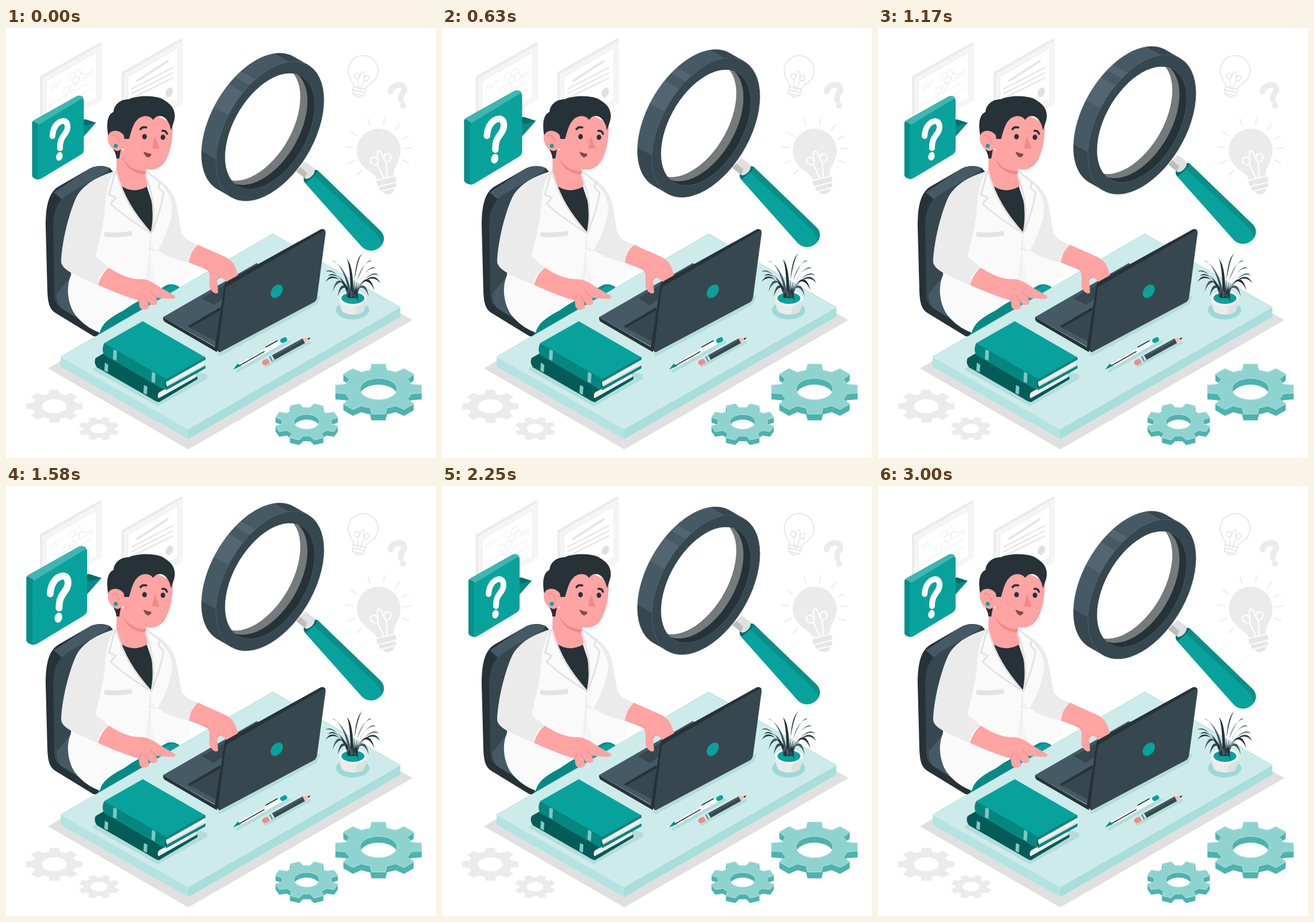
These frames come from a looping animation (748 by 748 pixels, 3040 ms). An HTML page:

```html
<!DOCTYPE html>
<html lang="en">
<head>
<meta charset="utf-8">
<title>Research desk</title>
<style>
html, body { margin: 0; width: 100%; height: 100%; overflow: hidden; background: #fff; }
svg { display: block; width: 100vw; height: 100vh; }
.line { fill: none; stroke-linecap: round; stroke-linejoin: round; }
</style>
</head>
<body>
<svg viewBox="0 0 748 748">
  <defs>
    <path id="filament" d="M645 262 640 236C628 238 627 222 635 222 642 222 644 231 640 236 646 231 641 214 648 214 655 214 650 231 656 236 652 231 654 222 661 222 669 222 668 238 656 236L651 262"/>
  </defs>
  <g id="frames">
    <path fill="#ebebeb" d="M59 84 164 25 167 27V124L63 182 59 205Z"/>
    <path fill="#f5f5f5" d="M63 87 167 28V125L63 186Z"/>
    <path fill="#fff" stroke="#ebebeb" d="M70 92 158 42V122L70 172Z"/>
    <g class="line" stroke="#ebebeb">
      <path d="M76 104 98 92M76 109 92 100M138 82 152 74M138 87 152 79M76 134 150 92M128 118 152 104"/>
      <path id="hexes"/>
    </g>
    <path fill="#ebebeb" d="M201 77 305 18 308 20V131L204 189 201 187Z"/>
    <path fill="#f5f5f5" d="M205 80 308 21V131L205 189Z"/>
    <path fill="#fff" stroke="#ebebeb" d="M212 85 299 35V124L212 174Z"/>
    <g class="line" stroke="#e6e6e6">
      <path stroke-width="4" d="M228 92 281 58"/>
      <path stroke-width="2.5" d="M219 106 290 69M219 114 290 78M219 122 290 87M262 126 272 121"/>
    </g>
    <ellipse cx="284" cy="112" rx="6" ry="8.5" fill="#e0e0e0" transform="rotate(25 284 112)"/>
  </g>

  <g id="bulbs">
    <g transform="rotate(12 621 75)" class="line" stroke="#e6e6e6" stroke-width="1.8">
      <path d="M611 105C610 96 595 91 595 74A26 26 0 0 1 647 74C647 91 632 96 631 105Z"/>
      <path d="M610 105H632V111H610ZM611 111H631V117H611ZM614 117Q621 125 628 117"/>
      <use href="#filament" stroke-width="2.4" transform="translate(180.500 -70) scale(.68)"/>
    </g>
    <g transform="translate(684 116) rotate(-14)">
      <path class="line" stroke="#ebebeb" stroke-width="10" stroke-linecap="butt" d="M-13 -9C-11 -20 12 -20 11 -8 10 0 1 -2 1 10"/>
      <circle cx="2" cy="20" r="5.5" fill="#ebebeb"/>
    </g>
    <path id="rays" class="line" stroke="#ebebeb" stroke-width="2"/>
    <g transform="rotate(-14 648 212)">
      <path fill="#ebebeb" d="M633 262C632 247 610 239 610 213A38 38 0 0 1 686 213C686 239 664 247 663 262Z"/>
      <path fill="#e6e6e6" d="M631 264H665V273H631ZM633 275H663V282H633ZM637 284H659Q656 291 648 291T637 284Z"/>
      <use href="#filament" class="line" stroke="#fff" stroke-width="2.2"/>
    </g>
  </g>
  <g id="gears"></g>

  <g id="chair">
    <path fill="#263238" d="M69 345C69 307 75 286 91 276L143 246C155 239 169 238 181 244L196 262 165 538 152 536 85 495C75 488 73 477 72 459Z"/>
    <path fill="#455a64" d="M83 286 143 246C155 239 169 238 181 244L174 252 102 298C98 301 93 294 83 286Z"/>
    <path fill="#37474f" d="M181 247 110 288C92 299 83 312 82 345L84 465C84 475 89 482 97 487L162 527 190 400Z"/>
    <path fill="#455a64" d="M88 462 113 432 165 530 97 488Q88 482 88 462Z"/>
  </g>

  <g id="person">
    <path fill="#078a85" d="M160 534C164 512 178 504 200 492L280 447Q291 443 302 451L250 492 168 540Z"/>
    <path fill="#08a29c" d="M240 476 288 447 300 452 250 488Z"/>
    <path fill="#fafafa" d="M189 249C150 262 128 275 118 310L113 430C104 450 107 478 119 497Q136 520 163 530C168 511 185 502 205 491L262 452 322 434V410C300 402 292 390 289 360L290 300C287 275 264 260 246 250Z"/>
    <path fill="#f5f5f5" d="M250 362C249 392 245 420 240 440L260 452 264 398Z"/>
    <path fill="#ebebeb" d="M248 256C272 263 290 280 296 305L305 356C310 367 322 373 334 377Q319 390 318 408C296 404 278 396 264 387 276 365 289 335 289 312 288 290 270 268 248 256Z"/>
    <path fill="#fafafa" d="M248 384Q285 400 318 409L322 425 262 445Z"/>
    <path class="line" stroke="#e6e6e6" d="M251 360Q251 405 246 438M248 384 264 387"/>
    <path fill="#ebebeb" d="M189 250C155 260 132 275 122 295 105 333 96 385 96 407 97 421 124 432 160 447 161 432 168 422 179 417L156 398C158 382 169 350 172 315 174 285 178 265 189 250Z"/>
    <path fill="#ffa3a3" d="M193 205 192 248C193 262 196 275 212 284 230 288 246 283 246 272L243 240Z"/>
    <path fill="#f08a8a" d="M204 226C212 242 226 248 243 249L242 255C222 254 208 242 204 226Z"/>
    <path fill="#263238" d="M196 272Q220 290 245 276L257 312Q261 335 253 357 214 327 196 272Z"/>
    <g stroke="#e3e3e3" stroke-width="3" fill="#fafafa" stroke-linejoin="round">
      <path d="M190 250 179 290 191 295 182 306C203 325 228 342 252 357 224 325 204 296 192 251Z"/>
      <path d="M245 250 268 268 265 277 274 287C270 314 260 340 253 357 260 325 257 293 243 256Z"/>
    </g>
    <path fill="#e3e3e3" d="M171 355Q195 357 219 353V361Q195 366 171 363Z"/>
    <g id="head">
      <path fill="#ffa3a3" d="M205 188 216 160 256 149 290 166C291 196 284 226 272 238 261 249 244 248 232 242 214 234 205 218 202 202Z"/>
      <path fill="#263238" d="M192 227C192 215 181 205 178 189 174 166 176 151 187 146 188 133 199 124 213 124 230 117 262 116 276 126 293 136 297 150 291 166L287 178C285 165 278 153 267 153 261 153 258 157 256 160 251 152 240 151 231 157 220 166 218 181 214 193L203 193 197 227Z"/>
      <path fill="#ffa3a3" d="M205 187C197 175 179 176 177 190 176 203 187 214 195 214L208 207Z"/>
      <path class="line" stroke="#f08a8a" stroke-width="1.5" d="M184 188Q193 183 197 199"/>
      <circle cx="191" cy="205" r="3.5" fill="#08a29c"/>
      <ellipse cx="241" cy="189" rx="4" ry="4.5" fill="#263238"/>
      <ellipse cx="273" cy="190" rx="4" ry="4.5" fill="#263238"/>
      <path class="line" stroke="#263238" stroke-width="3.5" d="M234 176Q237 171 244 173M272 179Q278 178 280 184"/>
      <path fill="#f08a8a" d="M259 188 254 209 267 210Z"/>
      <path fill="#7d4a4a" d="M239 215Q246 218 253 219 252 225 246 225 241 222 239 215Z"/>
    </g>
  </g>

  <g id="desk">
    <path fill="#e0e0e0" d="M73 592 95 579 317 700 686 496 707 508 317 733Z"/>
    <path fill="#cdebea" d="M95 572 464 358 686 486 317 698Z"/>
    <path fill="#b4e3e2" d="M95 572 317 698V715L95 589Z"/>
    <path fill="#a8dedb" d="M317 698 686 486V502L317 715Z"/>
    <path class="line" stroke="#9cd9d6" stroke-width=".8" d="M95 572 464 358 686 486"/>
  </g>

  <g id="books">
    <path fill="#b4dcda" d="M154 590 200 565 350 603V610L264 658 150 594Z"/>
    <path fill="#045c58" d="M156 574 222 536 333 600 264 641 268 650 158 590Q152 582 156 574Z"/>
    <path fill="#f0f0f0" d="M266 634 330 598 330 612 266 645Q262 640 266 634Z"/>
    <path fill="#045c58" d="M262 646 333 606V611L266 651Q260 650 262 646ZM156 574 264 634 262 650 158 590Z"/>
    <path fill="#7cc9c5" d="M172 582 178 586 177 599 171 596ZM240 621 246 624 245 638 239 635Z"/>
    <path fill="#08a29c" d="M171 548 238 510 347 573 278 613Z"/>
    <path fill="#058680" d="M171 548 278 610 276 630 171 569Q165 559 171 548Z"/>
    <path fill="#fafafa" d="M281 610 345 577 345 590 281 625Q276 618 281 610Z"/>
    <path fill="#e0e0e0" d="M280 620 345 584V590L281 625Z"/>
    <path fill="#058680" d="M277 611 347 572V577L280 615ZM276 626 347 587V592L279 630Z"/>
    <path fill="#7cc9c5" d="M187 559 193 562 192 579 186 576ZM254 598 260 601 259 618 253 615Z"/>
  </g>

  <g id="laptop-base">
    <path fill="#b4dcda" d="M290 523 366 568 548 464 541 481 372 571Z"/>
    <path fill="#455a64" d="M273 503 436 409 450 416 375 556 367 556Z"/>
    <path fill="#263238" d="M273 503 367 557V564L276 511Q273 509 273 503Z"/>
    <path fill="#37474f" d="M341 470 432 416 445 422 398 455 362 482Z"/>
    <path fill="#263238" d="M316 519 372 486 376 491 323 523Z"/>
    <path fill="#37474f" d="M320 521 375 490 370 548Z"/>
  </g>
  <g id="hands" fill="#ffa3a3">
    <path d="M179 417Q166 426 160 447C182 456 205 467 231 474L232 484C235 491 241 491 244 489L249 487 247 475Q251 482 256 482L262 481Q264 477 261 469 278 471 291 471 296 470 294 466L270 452C259 445 249 437 236 437 214 437 198 429 179 417Z"/>
    <path d="M334 377Q320 389 318 408L349 420C357 426 353 439 354 451 358 459 365 465 369 460L367 438Q374 430 383 441L393 447 405 435C400 416 396 405 381 398Z"/>
    <path class="line" stroke="#f08a8a" stroke-width="1.3" d="M231 474 236 464M247 475 240 465M261 469 251 459M367 438 371 433M345 415 352 421"/>
  </g>
  <g id="laptop-lid">
    <path fill="#263238" d="M363 557 380 447Q381 443 386 440L548 350Q553 349 556 353L384 452 371 564Z"/>
    <path fill="#37474f" d="M385 449 552 353Q556 351 556 357L541 469Q540 474 536 477L372 564Q368 564 369 558L382 455Q382 451 385 449Z"/>
    <ellipse cx="471" cy="458" rx="9" ry="13" fill="#08a29c" transform="rotate(38 471 458)"/>
  </g>

  <g id="pens" class="line">
    <path stroke="#b4dcda" stroke-width="5" d="M402 597 492 546M452 588 528 547"/>
    <path stroke="#fafafa" stroke-width="7" stroke-linecap="butt" d="M408 586 480 545"/>
    <path stroke="#37474f" stroke-width="2" d="M405 588 449 563"/>
    <path stroke="#08a29c" stroke-width="8" d="M481 544 485 542"/>
    <path fill="#078a85" d="M395 594 403 584 409 588Z"/>
    <path stroke="#263238" stroke-width="1.5" d="M452 555 472 544"/>
    <path stroke="#37474f" stroke-width="9" stroke-linecap="butt" d="M460 576 518 544"/>
    <path stroke="#455a64" stroke-width="3" stroke-linecap="butt" d="M459 574 517 542"/>
    <path stroke="#f08a8a" stroke-width="9" d="M450 582 454 580"/>
    <path stroke="#e0e0e0" stroke-width="9" stroke-linecap="butt" d="M457 578 465 573"/>
    <path stroke="#08a29c" stroke-width="9" stroke-linecap="butt" d="M460 576 462 575"/>
    <path fill="#ffb8b0" d="M516 540 529 539 520 548Z"/>
    <path fill="#263238" d="M525 539.500 530 538.500 526 543Z"/>
  </g>

  <g id="plant">
    <ellipse cx="603" cy="491" rx="29" ry="16" fill="#9cd9d6"/>
    <path fill="#ebebeb" d="M580 470H627C627 484 623 492 620 495Q604 502 587 495C583 491 580 484 580 470Z"/>
    <path fill="#e0e0e0" d="M610 484Q627 478 627 470C627 484 623 492 620 495Q614 498 608 498Z"/>
    <ellipse cx="603.500" cy="470" rx="24" ry="13" fill="#fafafa"/>
    <ellipse cx="603.500" cy="470" rx="20" ry="10" fill="#08a29c"/>
    <g id="leaves"></g>
  </g>

  <g id="bubble">
    <path fill="#078a85" d="M132 160 156 165 132 192Z"/>
    <path fill="#056e6a" d="M130 160 138 159 156 165 138 170Z"/>
    <path fill="#3fb6b1" d="M46 166Q46 162 50 160L123 119Q128 117 133 120L135 126 58 171Z"/>
    <path fill="#078f8a" d="M46 166Q46 162 49 163L57 168V263Q46 261 46 256Z"/>
    <path fill="#08a29c" d="M55 175Q55 170 60 167L129 125Q135 121 135 127V211Q135 217 130 220L62 261Q55 265 55 258Z"/>
    <path class="line" stroke="#fff" stroke-width="10" stroke-linecap="butt" d="M81 188C82 171 91 163 99 162 108 161 109 174 104 182 98 191 94 194 94 209"/>
    <ellipse cx="93" cy="223" rx="5.500" ry="7.500" fill="#fff" transform="rotate(15 93 223)"/>
  </g>

  <g id="lens">
    <g transform="translate(0 1.500)">
      <path fill="#08a29c" d="M518 260C520 250 532 243 542 246L650 350C661 360 659 372 650 380 640 389 626 387 618 378L520 268Q517 264 518 260Z"/>
      <path fill="#078f8a" d="M537 246 542 246 650 350C659 358 659 368 653 376 652 365 646 358 637 350L534 254Z"/>
      <path fill="#056e6a" d="M518 260C520 250 532 243 542 246 540 254 529 262 521 268Q517 264 518 260Z"/>
      <path fill="#e0e0e0" d="M505 248 521 231 537 243Q538 251 531 257 524 263 520 260Z"/>
      <path fill="#bdbdbd" d="M505 248 512 240 524 251 520 260Z"/>
    </g>
  </g>
</svg>
<script>
const $ = id => document.getElementById(id);
const rad = deg => deg * Math.PI / 180;
const toPath = pts => 'M' + pts.map(p => p.map(v => v.toFixed(1)).join(' ')).join('L') + 'Z';

function add(parent, tag, attrs) {
  const el = document.createElementNS('http://www.w3.org/2000/svg', tag);
  for (const key in attrs) el.setAttribute(key, attrs[key]);
  parent.append(el);
  return el;
}

// Gears lying on the ground plane
function gear(cx, cy, r, hole, turn, depth, top, side, rim) {
  const flat = (a, k) => [cx + k * Math.cos(a), cy + k * Math.sin(a) * .58];
  const pts = [], ring = [];
  for (let i = 0; i < 8; i++) {
    const a = rad(turn + i * 45);
    for (const [da, k] of [[-.25, .77], [-.16, 1], [.16, 1], [.25, .77], [.39, .77]]) {
      pts.push(flat(a + da, r * k));
    }
  }
  for (let i = 0; i < 48; i++) ring.push(flat(i * Math.PI / 24, hole));
  const shape = toPath(pts) + toPath(ring);
  for (let y = depth; y > 0; y--) {
    add($('gears'), 'path', { d: shape, fill: side, 'fill-rule': 'evenodd', transform: `translate(0 ${y})` });
  }
  add($('gears'), 'path', { d: shape, fill: top, 'fill-rule': 'evenodd', stroke: rim, 'stroke-width': 1 });
}
gear(84, 658, 49, 22, 0, 0, '#ebebeb', '', '#ebebeb');
gear(162, 697, 35, 15, 22.5, 0, '#ebebeb', '', '#ebebeb');
gear(648, 628, 76, 32, 0, 11, '#8fd3d0', '#4db3af', '#b9e3e1');
gear(523, 685, 56, 22, 22.5, 9, '#8fd3d0', '#4db3af', '#b9e3e1');

$('rays').setAttribute('d', [130, 156, 185, 213, 251, 281, 310, 335, 357, 23].map(deg => {
  const a = rad(deg), c = Math.cos(a), s = Math.sin(a);
  return `M${648 + 45 * c} ${212 + 45 * s}L${648 + 57 * c} ${212 + 57 * s}`;
}).join(''));

$('hexes').setAttribute('d', [[115, 84], [126, 78], [121, 91], [132, 85], [116, 102], [105, 108]].map(([x, y]) =>
  toPath([0, 1, 2, 3, 4, 5].map(i => {
    const c = 6.5 * Math.cos(i * Math.PI / 3);
    return [x + c * .9, y + 6.5 * Math.sin(i * Math.PI / 3) - c * .5];
  }))).join(''));

// Leaves: tip x, tip y, height of the arch above the tip
const shades = ['#263238', '#37474f', '#455a64'];
[[592, 402, 0], [622, 391, 0], [567, 405, 0], [636, 405, 2], [556, 424, 8], [649, 431, 12],
 [556, 442, 22], [651, 444, 24], [568, 459, 36], [641, 457, 36], [577, 467, 34], [631, 467, 34],
 [560, 432, 12], [643, 418, 6], [592, 474, 36], [613, 479, 40]].forEach(([x, y, arch], i) => {
  const bx = 603 + (x - 603) * .12, reach = x - bx, top = y - arch;
  const curve = (w, back) => {
    const near = `${bx + reach * .15 + w} ${top + 22 + Math.abs(w)}`;
    const far = `${bx + reach * .75 + w} ${top - 2 + Math.abs(w)}`;
    return back ? `C${far} ${near} ${bx + 2.5} 470` : `C${near} ${far} ${x} ${y}`;
  };
  add($('leaves'), 'path', { fill: shades[i % 3], d: `M${bx - 2.5} 469${curve(0)}${curve(x < 603 ? 5 : -5, true)}Z` });
});

// Magnifier ring: a circle on an upright isometric plane, extruded back
const lens = $('lens');
const rimPoint = (deg, r, k = 0) => {
  const c = r * Math.cos(rad(deg)), s = r * Math.sin(rad(deg));
  return [459 - 25 * k + .866 * c, 179.5 - 14.4 * k - s - .5 * c];
};
const arc = (from, to, r, k) => Array.from({ length: 61 }, (_, i) => rimPoint(from + (to - from) * i / 60, r, k));
const oval = (r, k) => toPath(arc(0, 360, r, k));
const fill = (d, color, more) => add(lens, 'path', { d, fill: color, ...more });

[[45, 70, '#37474f'], [70, 106, '#455a64'], [106, 112, '#526571'], [112, 120, '#455a64'],
 [120, 140, '#526571'], [140, 177, '#455a64'], [177, 225, '#37474f']].forEach(([a, b, color]) =>
  fill(toPath([...arc(a, b, 108.5, 0), ...arc(b, a, 108.5, 1)]), color, { stroke: color, 'stroke-width': .5 }));
fill(oval(108.5, 0) + oval(90, 0), '#37474f', { 'fill-rule': 'evenodd', stroke: '#455a64', 'stroke-width': .7 });
add(add(lens, 'clipPath', { id: 'opening' }), 'path', { d: oval(90, 0) });
const inside = { 'clip-path': 'url(#opening)' };
fill(oval(90, 0), '#263238');
fill(oval(90, .5), '#757a7c', inside);
fill(oval(90, 1), '#fff', inside);

// Motion
const loop = 3040;
const lift = [[0, 0], [1500, -15], [3000, 0], [loop, 0]];
const beat = [[0, 1.01], [280, 1.3], [380, 1.255], [540, 1.19], [860, 1], [1170, 1],
              [1340, 1.3], [1580, 1.19], [1630, 1.17], [1960, 1], [3000, 1], [loop, 1.01]];

function sample(track, t) {
  const i = track.findIndex(p => p[0] > t);
  const [t0, v0] = track[i - 1], [t1, v1] = track[i];
  return v0 + (v1 - v0) * (t - t0) / (t1 - t0);
}

function draw(now) {
  const t = Math.max(0, now - start) % loop;
  lens.setAttribute('transform', `translate(0 ${sample(lift, t)})`);
  $('bubble').setAttribute('transform', `translate(102.5 191) scale(${sample(beat, t)}) translate(-102.5 -191)`);
  requestAnimationFrame(draw);
}
const start = performance.now();
draw(start);
</script>
</body>
</html>
```
